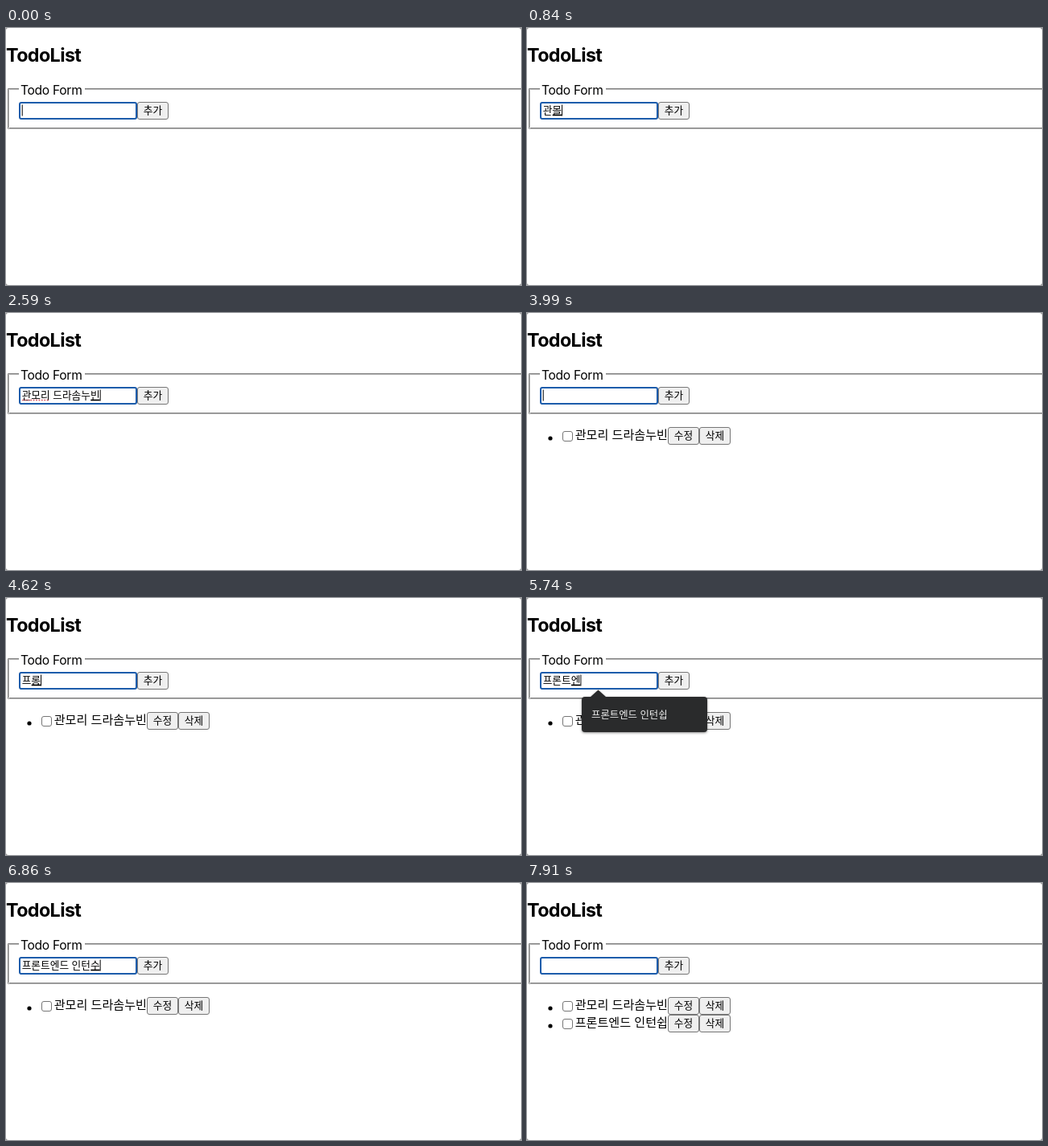
Recreate the animation shown at these times as an HTML page. Size 640 by 320 pixels, loop 8000 ms.

```html
<!DOCTYPE html>
<html lang="ko">
<head>
<meta charset="utf-8">
<title>TodoList</title>
<style>
html, body { margin: 0; width: 100%; height: 100%; overflow: hidden; background: #8a8a8a; }
svg { display: block; width: 640px; height: 320px; }
text { font-family: "Noto Sans CJK KR", "Noto Sans CJK JP", "Noto Sans CJK", sans-serif; white-space: pre; }
.latin { font-family: Inter, sans-serif; }
.small { font-size: 12.7px; }
.item { font-size: 15.1px; }
.mid { text-anchor: middle; }
.box { stroke: #767676; }
#menu { filter: drop-shadow(0 1px 1.5px rgba(0, 0, 0, .45)); }
</style>
</head>
<body>
<svg viewBox="0 0 640 320">
  <defs>
    <g id="btn"><rect class="box" x=".5" y=".5" width="38" height="21" rx="2.5" fill="#efefef"/></g>
  </defs>
  <rect width="640" height="320" rx="3" fill="#fff"/>
  <text class="latin" x="0" y="42" font-size="23.3" font-weight="700" letter-spacing="-.6">TodoList</text>

  <path d="M16 75.5H2.5V125.5M98 75.5H640M4 124.5H640" fill="none" stroke="#808080"/>
  <path d="M16 76.5H3.5V124M98 76.5H640M2 125.5H640" fill="none" stroke="#b4b4b4"/>
  <text class="latin" x="18" y="83" font-size="15.6" letter-spacing="-.3">Todo Form</text>

  <rect x="17" y="93" width="145" height="20" rx="2" fill="#fff" stroke="#1c5cab" stroke-width="2"/>
  <text id="value" class="small" x="19.7" y="106.8"></text>
  <path id="spell" d="M21 108.5H53" stroke="#d8606c" stroke-width="2" stroke-linecap="round" stroke-dasharray="0 3.4"/>
  <rect id="mark" y="107.6" height="1.7"/>
  <rect id="caret" y="95.5" width="1" height="14"/>
  <use href="#btn" x="163" y="92"/>
  <text class="small mid" x="182.5" y="106.8">추가</text>

  <g id="list"></g>

  <g id="menu">
    <path d="M72 123H79L88.5 114.5L98 123H220Q224 123 224 127V163Q224 167 220 167H72Q68 167 68 163V127Q68 123 72 123Z" fill="#2a2b2c"/>
    <text id="hint" x="80" y="149.7" font-size="12.4" fill="#ececec"></text>
  </g>
</svg>
<script>
const LOOP = 8000;
const $ = id => document.getElementById(id);
const todos = [
  { text: '관모리 드라솜누빈', added: 3080, committed: 2940 },
  { text: '프론트엔드 인턴쉽', added: 7420, committed: 7350 }
];
const word = '관모리 ', job = '프론트엔드 ';

// [time, typed value, suggestion open]
const steps = [
  [0, ''], [210, 'ㄱ'], [280, '고'], [350, '과'], [490, '관'], [560, '관', 1],
  [630, '관ㅁ'], [700, '관모'], [770, '관모', 1], [840, '관몰'],
  [980, '관모리'], [1050, '관모리', 1], [1260, word, 1],
  [1330, word + 'ㄷ'], [1400, word + '드'], [1470, word + '들'],
  [1540, word + '드라'], [1610, word + '드라', 1], [1750, word + '드랏'],
  [1820, word + '드라소'], [1960, word + '드라솜'], [2030, word + '드라솜', 1],
  [2240, word + '드라솜ㄴ'], [2310, word + '드라솜누'], [2380, word + '드라솜누', 1],
  [2450, word + '드라솜눕'], [2520, word + '드라솜누비'], [2590, todos[0].text],
  [3080, ''],
  [4270, '프'], [4340, '프', 1], [4410, '플'], [4480, '프로'], [4620, '프롱'],
  [4970, '프로'], [5040, '프ㄹ'], [5180, '프로'], [5250, '프론'], [5320, '프론', 1],
  [5530, '프론ㅌ'], [5600, '프론트'], [5670, '프론트엔'], [5740, '프론트엔', 1],
  [5810, '프론트엔ㄷ'], [5880, '프론트엔드', 1], [6020, job, 1],
  [6160, job + 'ㅇ'], [6230, job + '인'], [6300, job + '인', 1],
  [6440, job + '인ㅌ'], [6510, job + '인터'], [6580, job + '인턴'], [6650, job + '인턴', 1],
  [6790, job + '인턴ㅅ'], [6860, job + '인턴수'], [7000, job + '인턴쉬'], [7070, todos[1].text],
  [7420, '']
];

const button = (x, y, label) =>
  `<use href="#btn" x="${x}" y="${y}"/><text class="small mid" x="${x + 19.5}" y="${y + 14.8}">${label}</text>`;

$('list').innerHTML = todos.map(({ text }, i) => {
  const y = 142 + 22 * i;
  return `<g><circle cx="29" cy="${y + 14}" r="2.6"/>
    <rect class="box" x="44.5" y="${y + 5.5}" width="12" height="12" rx="2.5" fill="#fff"/>
    <text class="item" x="59.7" y="${y + 15.4}">${text}</text>
    ${button(175, y, '수정')}${button(214, y, '삭제')}</g>`;
}).join('');

const show = (el, on) => el.setAttribute('visibility', on ? 'visible' : 'hidden');
const field = $('value'), rows = $('list').children;
const left = 19.7;
const widthTo = n => n ? field.getSubStringLength(0, n) : 0;

function draw(t) {
  const [, value, open] = steps.findLast(s => s[0] <= t);
  const todo = todos[t < todos[0].added ? 0 : 1];
  if (field.textContent !== value) field.textContent = value;

  const end = left + widthTo(value.length);
  const start = left + widthTo(Math.max(0, value.length - 1));
  $('caret').setAttribute('x', end);
  $('mark').setAttribute('x', start + .3);
  $('mark').setAttribute('width', Math.max(0, end - start - .3));
  $('hint').textContent = todo.text;

  show($('caret'), !(t >= 3500 && t < 3990 || t >= 7910));
  show($('mark'), value && !value.endsWith(' ') && t < todo.committed);
  show($('spell'), value.startsWith(word));
  show($('menu'), open);
  todos.forEach((item, i) => show(rows[i], t >= item.added));
}

const began = performance.now();
function tick() {
  draw((performance.now() - began) % LOOP);
  requestAnimationFrame(tick);
}
tick();
</script>
</body>
</html>
```
